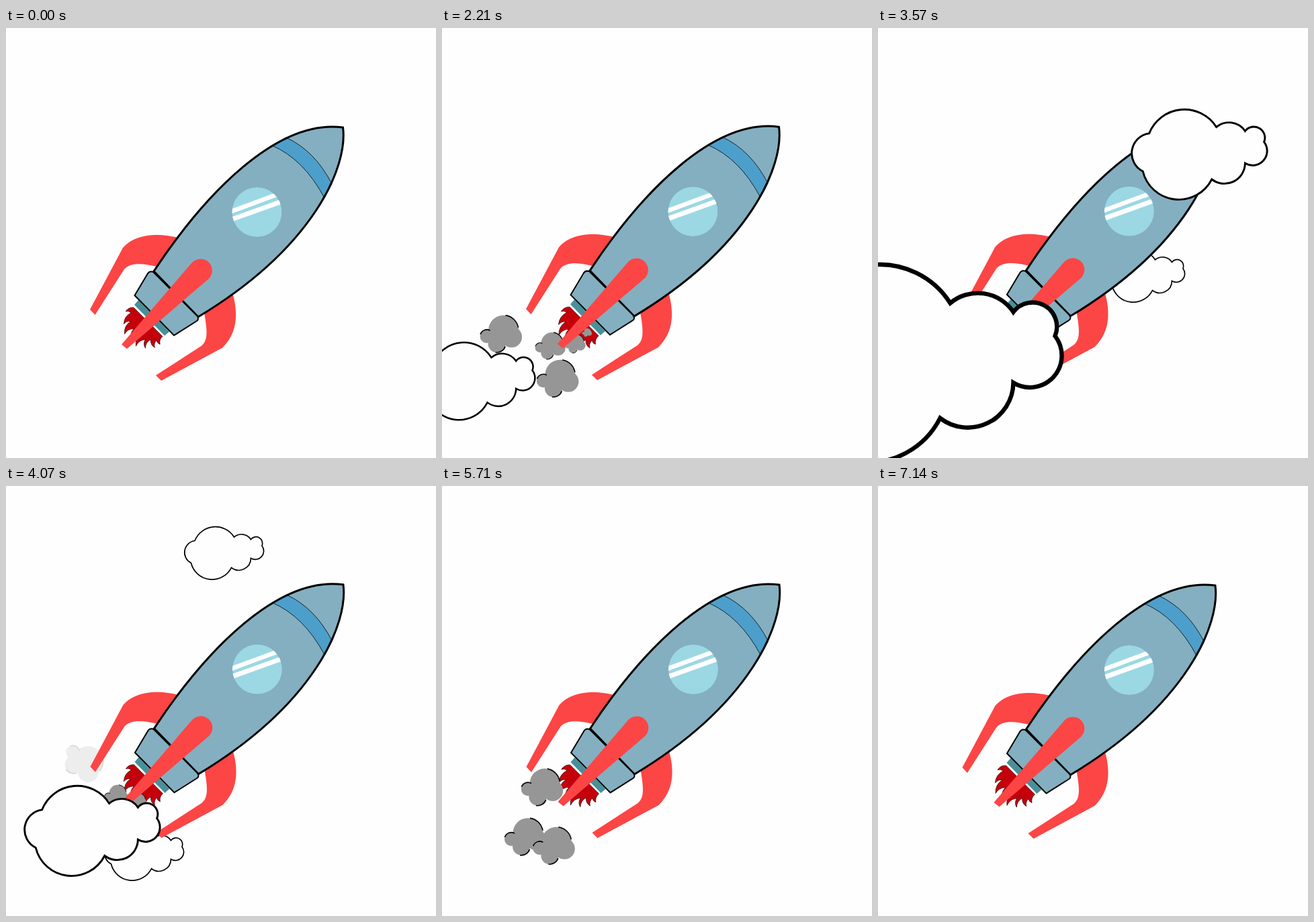
Animation of 640x640 px, one loop 7.21 s. Source, as an HTML page:

```html
<!DOCTYPE html>
<html lang="en">
<head>
<meta charset="utf-8">
<title>Rocket</title>
<style>
  html, body { margin: 0; width: 100%; height: 100%; overflow: hidden; background: #fefefe; }
  svg { display: block; width: 100vw; height: 100vh; }
</style>
</head>
<body>
<svg viewBox="0 0 640 640">
  <defs>
    <path id="cloud" fill="#fefefe" stroke="#000" stroke-width="1.7" d="M25.5 21A33 33 0 0 1 84 15.5A17 17 0 0 1 109 19A9.6 9.6 0 0 1 125.5 28.5A12.6 12.6 0 0 1 109 47A18 18 0 0 1 80 61A32.2 32.2 0 0 1 20 54A17.5 17.5 0 0 1 25.5 21Z"/>
    <g id="puff">
      <g fill="#969696">
        <circle r="22.5"/><circle cx="12" cy="10" r="15.5"/>
        <circle cx="-25" cy="9" r="10"/><circle cx="-10" cy="20" r="13"/>
      </g>
      <path fill="none" stroke="#000" stroke-width="1.6" d="M3 -22.3A22.5 22.5 0 0 1 22 -4M-34.5 6A10 10 0 0 1 -20 0.3M-12 32.8A13 13 0 0 0 2.5 24"/>
    </g>
    <path id="hull" d="M220 362C298 244 405 135 501.5 148C509 205 460 325 286 430Z"/>
    <clipPath id="glass"><circle cx="373.5" cy="274" r="37"/></clipPath>
  </defs>
  <g id="back"></g>
  <g class="ship">
    <path id="flame" fill="#c4000b" stroke="#200" stroke-width=".7"/>
  </g>
  <g id="smoke"></g>
  <g class="ship">
    <g fill="#fc4545">
      <path d="M256 312C235 307 197 302 174 327L125 419L132.5 427L176 359C184 350 200 349 224 355Z"/>
      <path d="M337 394C343 415 349 450 322 476L231 525L223 517L291 473C299 466 301 456 295 424Z"/>
    </g>
    <path fill="#48909a" d="M197 405L191 412L236 458L243 452Z"/>
    <use href="#hull" fill="#84afc0"/>
    <path fill="#4d9fcb" stroke="#000" stroke-width=".8" d="M417 163Q460 183 485 232L474 253Q443 195 396 175Z"/>
    <use href="#hull" fill="none" stroke="#000" stroke-width="3"/>
    <path fill="#84afc0" stroke="#000" stroke-width="2" d="M191.5 398L210 367Q213 361 219 363L284 428Q288 433 284 436L250 457.5Z"/>
    <g clip-path="url(#glass)" stroke="#fff">
      <circle cx="373.5" cy="274" r="37" fill="#9bd8e3" stroke="none"/>
      <path stroke-width="6.5" d="M330 275L415 243.5"/>
      <path stroke-width="7" d="M330 287L415 256.5"/>
    </g>
    <path fill="#fc4545" d="M277 349A17.2 17.2 0 1 1 302 373L180 477.5L172 471Z"/>
  </g>
  <g id="front"></g>
</svg>
<script>
const LOOP = 7210, STEP = 1000 / 14;
const $ = id => document.getElementById(id);

// layer, scale, time at which the cloud is at x, y, then its speed in px/s
const fast = [-960, 870], mid = [-650, 560], slow = [-384, 358];
const clouds = [
  ['back', 1.47, 1430, 306, 147, [-393, 354], 70],
  ['back', 1, 3070, 521, 150, slow],
  ['back', 1, 4070, 256, 60, slow],
  ['back', 1.47, 4300, 600, 85, mid],
  ['back', 1, 4790, 370, -78, mid],
  ['front', 1.47, 3070, -77, 500, fast],
  ['front', 3.76, 3070, 273, -85, fast],
  ['front', 1.71, 4070, 11, 445, [-700, 650]]
].map(([layer, s, time, x, y, v, acc = 0]) =>
  ({ s, time, x, y, v, acc, el: add(layer, 'cloud') }));

// birth, fade start, fade end; x, y, scale at age REF; speeds and growth
const REF = 780;
const puffs = [
  [-200, 1000, 1550, 92, 450, 1, -100, -10, .58],
  [-200, 1000, 1550, 176, 516, 1, -27, 64, .64],
  [250, 2050, 2450, 164, 469, .72, -40, 53, .33],
  [400, 2100, 2450, 200, 467, .5, -33, 70, .58],
  [600, 2200, 2720, 217, 452, .25, -90, 2, .84]
];
const smoke = [1430, 4035].flatMap(start =>
  puffs.map((p, i) => ({ start, p, curl: i === 4, el: add('smoke', 'puff') })));
const ship = document.querySelectorAll('.ship');

function add(parent, ref) {
  const el = document.createElementNS('http://www.w3.org/2000/svg', 'use');
  el.setAttribute('href', '#' + ref);
  return $(parent).appendChild(el);
}

const place = (el, value) => el.setAttribute('transform', value);
const show = (el, on) => el.setAttribute('display', on ? 'inline' : 'none');
const clamp = v => Math.max(0, Math.min(1, v));

// Curved tongues: roots and tips alternate
function flamePath() {
  const pts = '190,416 178,422 186,424 175,441 185,437 176,456 190,448 186,466 200,456 193,474 207,464 207,477 215,464 221,476 224,465 229,471 233,459'
    .split(' ').map(p => p.split(',').map(Number));
  return pts.slice(1).reduce((d, [x, y], i) => {
    const [px, py] = pts[i], bend = i % 2 ? .3 : -.3;
    const cx = (x + px) / 2 + bend * (y - py), cy = (y + py) / 2 - bend * (x - px);
    return `${d}Q${cx} ${cy} ${x} ${y}`;
  }, 'M' + pts[0]) + 'Z';
}
$('flame').setAttribute('d', flamePath());

function drawCloud(c, t) {
  const u = (t - c.time) / 1000;
  const x = c.x + c.v[0] * u - 1.11 * c.acc * u * u;
  const y = c.y + c.v[1] * u + c.acc * u * u;
  const inside = x < 645 && x > -135 * c.s && y < 645 && y > -82 * c.s;
  show(c.el, inside && !(c.acc && t > 2300));
  place(c.el, `translate(${x} ${y}) scale(${c.s})`);
}

function drawPuff({ start, p, curl, el }, t) {
  const [born, fade, gone, x0, y0, s0, vx, vy, grow] = p;
  const age = t - start, u = (age - REF) / 1000, bend = curl ? u * u : 0;
  show(el, age > born && age < gone);
  const x = x0 + vx * u + 21 * bend, y = y0 + vy * u - 13.3 * bend;
  const s = clamp(s0 + grow * u) * clamp((age - born) / 200);
  const turn = curl ? Math.max(0, age - 1640) / 20 : 0;
  place(el, `translate(${x} ${y}) rotate(${turn}) scale(${s})`);
  el.setAttribute('opacity', clamp((gone - age) / (gone - fade)));
}

function draw(ms) {
  const n = Math.floor((ms % LOOP + 5) / STEP), t = n * STEP;
  clouds.forEach(c => drawCloud(c, t));
  smoke.forEach(p => drawPuff(p, t));

  const dx = -.3 + .8 * Math.sin(n * 1.9 + .4), dy = -.6 + .6 * Math.cos(n * 2.7);
  ship.forEach(g => place(g, `translate(${dx} ${dy})`));

  const k = 1.03 - .05 * Math.cos(n * .9);
  place($('flame'), `translate(211 437) rotate(45) scale(1 ${k}) rotate(-45) translate(-211 -437)`);
}

const begin = performance.now();
function tick() {
  draw(performance.now() - begin);
  requestAnimationFrame(tick);
}
tick();
</script>
</body>
</html>
```
